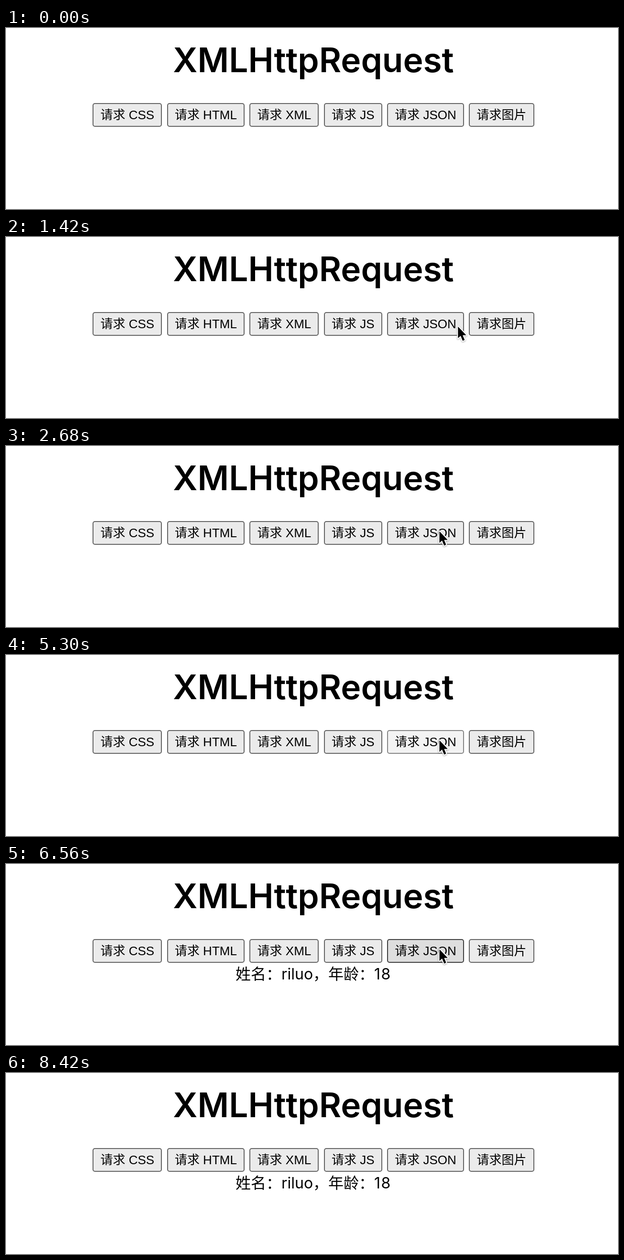
Write an HTML page that moves like this. It is 1280 px wide and 381 px high and loops after 9.12 s.

```html
<!DOCTYPE html>
<html lang="zh-CN">
<head>
<meta charset="utf-8">
<title>XMLHttpRequest</title>
<style>
  html, body { margin: 0; width: 100%; height: 100%; overflow: hidden; background: #fff; }
  body { position: relative; color: #000; }
  h1, nav, p, svg { position: absolute; margin: 0; left: 0; }
  h1, nav, p { width: 1286px; text-align: center; white-space: nowrap; }
  h1, p { font-family: Inter, "Noto Sans CJK SC", "Noto Sans CJK JP", sans-serif; }
  h1 { top: 17px; font-size: 71.2px; line-height: 100px; font-weight: 600; }
  p { top: 212px; font-size: 32px; line-height: 40px; }
  p span { letter-spacing: 1.5px; }
  nav { top: 158px; display: flex; justify-content: center; gap: 10.3px; }
  nav span {
    padding: 0 14.2px; border: 2px solid #666; border-radius: 5px; background: #ebebeb;
    font: 26px/46px "Liberation Sans", "Noto Sans CJK SC", "Noto Sans CJK JP", sans-serif;
  }
  nav .hover { background: #dedede; border-color: #404040; }
  nav .active { background: #f3f3f3; border-color: #868686; }
  svg { top: 0; overflow: visible; filter: drop-shadow(0 1.5px 1.5px rgba(0, 0, 0, .35)); }
  path { stroke: #fff; stroke-width: 4; stroke-linejoin: round; paint-order: stroke; }
</style>
</head>
<body>
<h1>XMLHttpRequest</h1>
<nav>
  <span>请求 CSS</span><span>请求 HTML</span><span>请求 XML</span><span>请求 JS</span><span id="json">请求 JSON</span><span>请求图片</span>
</nav>
<p id="answer">姓名：riluo，年龄：<span>18</span></p>
<svg id="cursor" width="24" height="38"><path d="M.5 2.5V27L6 22L10.3 32.5L14.5 30.7L10.3 20.7H17.8Z"/></svg>
<script>
const LOOP = 9120, PRESS = 5300, RELEASE = 5460;
const [json, answer, cursor] = ['json', 'answer', 'cursor'].map(id => document.getElementById(id));

const linear = p => p;
const easeOut = p => 1 - (1 - p) ** 2;
const easeIn = p => p ** 1.5;

// pointer tip: time, x, y, easing on the way there
const keys = [
  [720, 1077, 350],
  [860, 1024, 251, linear],
  [1420, 945, 186, easeOut],
  [1560, 919, 179, linear],
  [1940, 906, 177, easeOut],
  [6560, 906, 177, linear],
  [6840, 1282, 108, easeIn],
];

function pointerAt(t) {
  const i = keys.findIndex(key => key[0] > t);
  if (i < 1) return null;
  const [t0, x0, y0] = keys[i - 1], [t1, x1, y1, ease] = keys[i];
  const p = ease((t - t0) / (t1 - t0));
  return { x: x0 + (x1 - x0) * p, y: y0 + (y1 - y0) * p };
}

function buttonState(t, tip) {
  if (t < PRESS) return '';
  if (t < RELEASE) return 'active';
  return tip && tip.x < 958 ? 'hover' : '';
}

function draw(t) {
  const tip = pointerAt(t);
  cursor.style.visibility = tip ? 'visible' : 'hidden';
  if (tip) cursor.style.transform = `translate(${tip.x}px, ${tip.y}px)`;
  answer.style.visibility = t < RELEASE ? 'hidden' : 'visible';
  json.className = buttonState(t, tip);
}

const start = performance.now();
function tick() {
  draw((performance.now() - start) % LOOP);
  requestAnimationFrame(tick);
}
tick();
</script>
</body>
</html>
```
